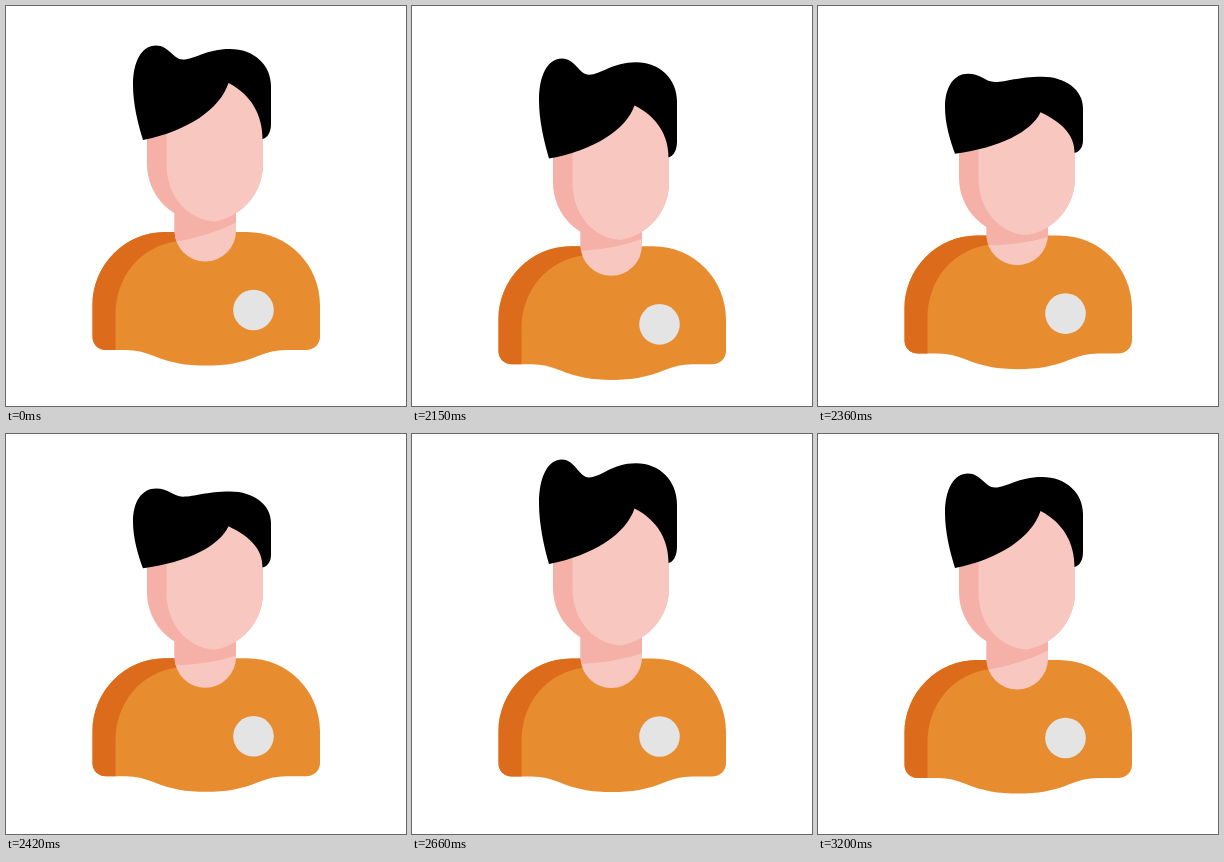
An HTML page for the animation above (3230 ms loop, 400x400 px).

```html
<!DOCTYPE html>
<html lang="en">
<head>
<meta charset="utf-8">
<title>Avatar bounce</title>
<style>
  html, body { margin: 0; width: 100%; height: 100%; overflow: hidden; background: #fff; }
  svg { display: block; width: 100%; height: 100%; }
</style>
</head>
<body>
<svg viewBox="0 0 400 400">
  <defs>
    <clipPath id="neckClip"><path d="M168.5 180H230V224.8a30.75 30.75 0 0 1-61.5 0Z"/></clipPath>
  </defs>
  <g id="body">
    <path fill="#e88c30" d="M159 226H241C282 226 314 259 314 299V331C314 338 308 344 300 344H280C270 344 262 346 252 350C235 357 220 359.6 200 359.6S165 357 148 350C138 346 130 344 120 344H100C92 344 86.5 338 86.5 331V299C86.5 259 119 226 159 226Z"/>
    <path fill="#dd6b1c" d="M159 226H172V235C135 240 109.5 270 109.5 309V344H100C92 344 86.5 338 86.5 331V299C86.5 259 119 226 159 226Z"/>
    <circle fill="#e4e4e4" cx="247.5" cy="304" r="20.3"/>
    <g clip-path="url(#neckClip)">
      <path fill="#f8c7c0" d="M160 180H240V260H160Z"/>
      <path id="shade" fill="#f5b0a8"/>
    </g>
  </g>
  <g id="head">
    <path fill="#f5b0a8" d="M141 100V158a58 58 0 0 0 116 0V100Z"/>
    <path fill="#f8c7c0" d="M160.5 74V158C160.5 191 182 214 209 215.4A58 58 0 0 0 257 158V74Z"/>
  </g>
  <path id="hair"/>
</svg>
<script>
const LOOP = 3230, START = 2030, STEP = 30;

// [time, value] poses, eased in and out between neighbours
const tracks = {
  body: [[2000, 0], [2200, 17], [2460, -3], [2860, 0]],
  head: [[2020, 0], [2250, 31], [2480, -6], [2580, -7], [2820, 5], [3120, 0]],
  top: [[2000, 39.5], [2040, 38.5], [2295, 74], [2600, 21], [2820, 45.3], [3150, 39.5]],
  part: [[2020, 77], [2265, 118], [2560, 70], [2820, 84], [3140, 77]],
  shadeL: [[2030, 236], [2250, 252], [2450, 230], [2660, 230], [2840, 236]],
  shadeR: [[2020, 216], [2250, 244], [2460, 219], [2660, 219], [2840, 219], [3120, 216]]
};

const $ = id => document.getElementById(id);

function at(keys, t) {
  if (t <= keys[0][0]) return keys[0][1];
  for (let i = 1; i < keys.length; i++) {
    const [t0, a] = keys[i - 1], [t1, b] = keys[i];
    if (t < t1) {
      const u = (t - t0) / (t1 - t0);
      return a + (b - a) * u * u * (3 - 2 * u);
    }
  }
  return keys[keys.length - 1][1];
}

function hairPath(head, top, part) {
  const stretch = top - 39.5 - head;
  const pull = part - 77 - head;
  const y = v => (v + head + stretch * (134 - v) / 94.5).toFixed(2);
  const dip = (+y(53.5) - stretch * 0.25).toFixed(2);
  const inner = (v, k) => (v + head + pull * k).toFixed(2);
  return `M137 ${y(134)}C132 ${y(118)} 127 ${y(98)} 127 ${y(79)}` +
    `C127 ${y(55)} 136 ${y(39.5)} 150 ${y(39.5)}` +
    `C163 ${y(39.5)} 167 ${dip} 177 ${dip}` +
    `C189 ${dip} 200 ${y(43)} 224 ${y(43)}` +
    `C248 ${y(43)} 265 ${y(59)} 265 ${y(80)}` +
    `V${y(118)}C265 ${y(127)} 261 ${y(132)} 256.5 ${y(133)}` +
    `C256.5 ${inner(110, 0.4)} 246 ${inner(89, 0.95)} 222.5 ${inner(77, 1)}` +
    `C214 ${inner(103, 0.55)} 182 ${inner(125, 0.2)} 137 ${y(134)}Z`;
}

function draw(t) {
  const p = {};
  for (const name in tracks) p[name] = at(tracks[name], t);
  const l = p.shadeL - p.body, r = p.shadeR - p.body;
  $('body').setAttribute('transform', `translate(0 ${p.body})`);
  $('head').setAttribute('transform', `translate(0 ${p.head})`);
  $('shade').setAttribute('d', `M168 170H231V${r}Q204 ${(l + r) / 2 + 4} 168 ${l}Z`);
  $('hair').setAttribute('d', hairPath(p.head, p.top, p.part));
}

function tick() {
  const t = performance.now() % LOOP;
  draw(t < START ? 0 : START + Math.floor((t - START) / STEP) * STEP);
  requestAnimationFrame(tick);
}
tick();
</script>
</body>
</html>
```
